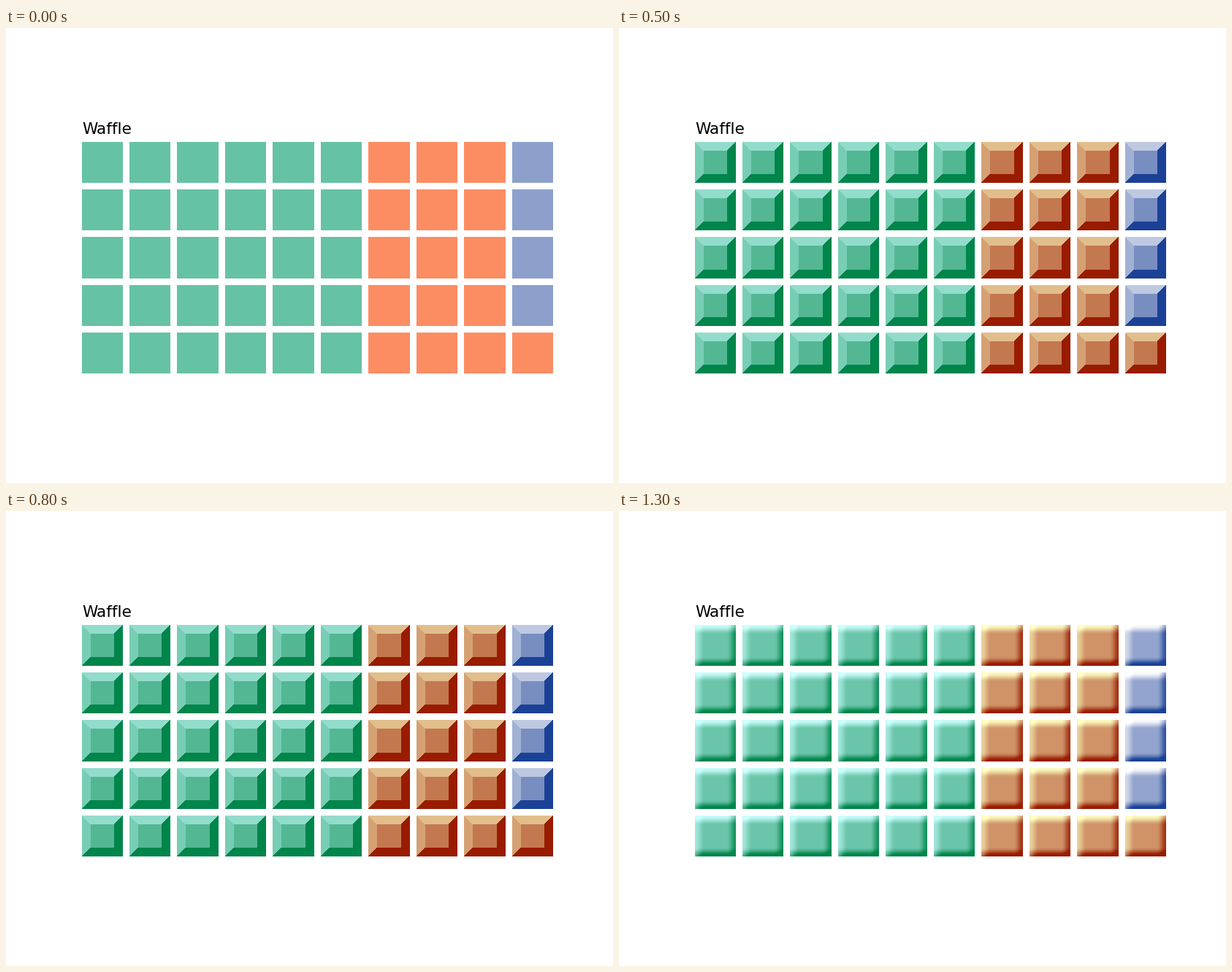
A matplotlib script for the animation above (1.5 s loop, 831 px wide and 623 px high).

```python
import numpy as np
import matplotlib.pyplot as plt
from matplotlib.animation import FuncAnimation

W, H, DPI = 831, 623, 128
ROWS = 5
COUNTS = (30, 16, 4)
LEFT, TOP, SIZE = 104, 156, 56.4
PITCH_X, PITCH_Y = 65.45, 65.38
BEVEL = 12        # width of the hard bevel
SOFT = 13         # reach of the soft shading

COLORS = plt.get_cmap("Set2")(range(len(COUNTS)))[:, :3]


def overlay(base, light):
    """Overlay blend of a colour with a light map, 0 dark to 1 bright."""
    base, light = np.minimum(base, 0.8), light[..., None]
    return np.where(base <= 0.5, 2 * light * base,
                    1 - 2 * (1 - light) * (1 - base))


def flat(base, edges):
    return base


def hard(base, edges):
    """Mitred bevel: lit from the upper left, dark on the far sides."""
    top, left, right, bottom = edges
    side = np.where(top < right, 0.716, 0.0)
    side = np.where(left < np.minimum(top, bottom), 0.588, side)
    side = np.where(bottom <= np.minimum(left, right), 0.0, side)
    return overlay(base, np.where(edges.min(axis=0) < BEVEL, side, 0.407))


def slope(dist):
    t = np.clip(dist / SOFT, 0, 1)
    return (1 + np.cos(np.pi * t)) / 2


def height(dist):
    t = np.clip(dist / SOFT, 0, 1)
    return (1 + t + np.sin(np.pi * t) / np.pi) / 2


def smooth(base, edges):
    """Soft pillow: the slopes of a blurred square under the same light."""
    top, left, right, bottom = edges
    sx = (slope(left) - slope(right)) * height(np.minimum(top, bottom))
    sy = (slope(top) - slope(bottom)) * height(np.minimum(left, right))
    light = 0.525 + 0.35 * sx + 0.53 * sy - 0.08 * (sx ** 2 + sy ** 2)
    return overlay(base, np.clip(light, 0, 1))


def span(start, pitch, n):
    """First and end pixel of the n-th tile along one axis."""
    low = start + n * pitch
    return int(low), int(low + SIZE)


def waffle(style):
    img = np.ones((H, W, 3))
    for n, kind in enumerate(np.repeat(range(len(COUNTS)), COUNTS)):
        col, up = divmod(n, ROWS)
        x0, x1 = span(LEFT, PITCH_X, col)
        y0, y1 = span(TOP, PITCH_Y, ROWS - 1 - up)
        x, y = np.meshgrid(np.arange(x0, x1) + 0.5, np.arange(y0, y1) + 0.5)
        edges = np.stack([y - y0, x - x0, x1 - x, y1 - y])
        img[y0:y1, x0:x1] = style(COLORS[kind], edges)
    return np.round(img * 255).astype(np.uint8)


pictures = [waffle(style) for style in (flat, hard, smooth)]

fig = plt.figure(figsize=(W / DPI, H / DPI), dpi=DPI, facecolor="white")
image = fig.figimage(pictures[0], origin="upper")
fig.text(LEFT / W, 1 - 145 / H, "Waffle", family="DejaVu Sans",
         color="black", size=12 * 130 / DPI, ha="left", va="baseline")


def update(i):
    image.set_data(pictures[i])
    return [image]


anim = FuncAnimation(fig, update, frames=len(pictures), interval=500, repeat=True)
plt.show()
```
